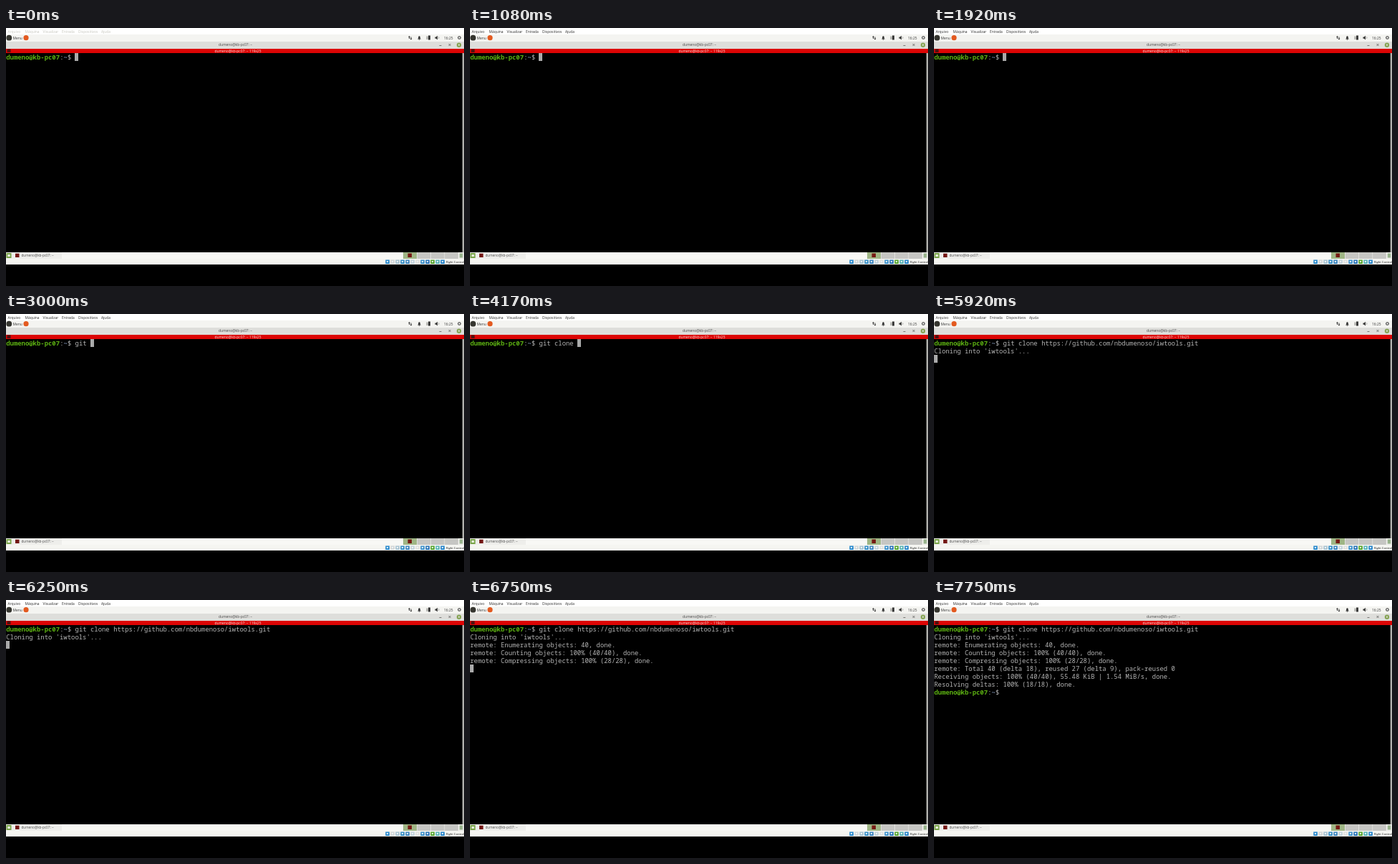
An HTML page with a canvas for the animation above (8000 ms loop, 640 px wide and 360 px high).

```html
<!DOCTYPE html>
<html lang="pt">
<head>
<meta charset="utf-8">
<title>Terminal</title>
<style>
html, body { margin: 0; width: 100%; height: 100%; overflow: hidden; background: #000; }
canvas { display: block; width: 640px; height: 360px; }
</style>
</head>
<body>
<canvas id="stage" width="640" height="360"></canvas>
<script>
const ctx = document.getElementById('stage').getContext('2d');
const LOOP = 8000;
const COL = 5.355, ROW = 11, TOP = 35;
const MONO = '"Noto Sans Mono", "DejaVu Sans Mono", monospace';
const SANS = '"Open Sans", "Noto Sans", sans-serif';
const INK = '#b4b4b4', GREEN = '#5cb012', GREY = '#aaaaaa';
const DARK = '#3a3a3a', PANEL = '#f4f4f1', TITLEBAR = '#dededb';

const HOST = 'dumeno@kb-pc07';
const TITLE = HOST + ': ~';
const PROMPT_LENGTH = HOST.length + 4;
const URL_TEXT = 'https://github.com/nbdumenoso/iwtools.git';
const COMMAND = 'git clone ';
const KEY_TIMES = [2580, 2670, 2830, 3000, 3420, 3580, 3750, 3920, 4080, 4170];
const MENU_ON = 1080, PASTE = 4830, ENTER = 5830, CURSOR_OFF = 7750;
const OUTPUT = [
  [5920, "Cloning into 'iwtools'..."],
  [6670, 'remote: Enumerating objects: 40, done.'],
  [6670, 'remote: Counting objects: 100% (40/40), done.'],
  [6750, 'remote: Compressing objects: 100% (28/28), done.'],
  [6920, 'remote: Total 40 (delta 18), reused 27 (delta 9), pack-reused 0'],
  [6920, 'Receiving objects: 100% (40/40), 55.48 KiB | 1.54 MiB/s, done.'],
  [7000, 'Resolving deltas: 100% (18/18), done.']
];
const PROMPT_BACK = 7080;

function rect(x, y, w, h, color) {
  ctx.fillStyle = color;
  ctx.fillRect(x, y, w, h);
}

function dot(x, y, r, color) {
  ctx.fillStyle = color;
  ctx.beginPath();
  ctx.arc(x, y, r, 0, Math.PI * 2);
  ctx.fill();
}

function line(color, width, ...points) {
  ctx.strokeStyle = color;
  ctx.lineWidth = width;
  ctx.beginPath();
  points.forEach(([x, y]) => ctx.lineTo(x, y));
  ctx.stroke();
}

function shape(color, ...points) {
  ctx.fillStyle = color;
  ctx.beginPath();
  points.forEach(([x, y]) => ctx.lineTo(x, y));
  ctx.fill();
}

function label(str, x, y, color = DARK, size = 4.9, align = 'left') {
  ctx.font = `${size}px ${SANS}`;
  ctx.textAlign = align;
  ctx.fillStyle = color;
  ctx.fillText(str, x, y);
}

function mono(str, col, row, color = INK, weight = 400) {
  ctx.font = `${weight} ${COL / 0.6}px ${MONO}`;
  ctx.textAlign = 'left';
  ctx.fillStyle = color;
  ctx.fillText(str, col * COL + 0.2, TOP + row * ROW + 9);
}

function block(col, row, count = 1) {
  rect(Math.round(col * COL), TOP + row * ROW, Math.round(count * COL), ROW, GREY);
}

function prompt(row) {
  mono(HOST, 0, row, GREEN, 700);
  mono(':', HOST.length, row);
  mono('~', HOST.length + 1, row, '#7f93b4', 700);
  mono('$', HOST.length + 2, row);
}

function drawMenu(t) {
  rect(0, 0, 640, 9, '#ffffff');
  const color = t < MENU_ON ? '#c6c6be' : '#2c2c2c';
  const items = [['Arquivo', 2.5], ['Máquina', 26.5], ['Visualizar', 51.5],
    ['Entrada', 78], ['Dispositivos', 101], ['Ajuda', 133]];
  items.forEach(([name, x]) => label(name, x, 6.5, color));
}

function drawPanel() {
  rect(0, 9, 640, 10, PANEL);
  dot(4.3, 13.7, 3.9, '#35352f');
  label('Menu', 9.5, 15.5);
  dot(28, 13.7, 3.6, '#e35a20');

  line(DARK, 1, [563.5, 11.5], [563.5, 15]);
  line(DARK, 1, [566, 12.5], [566, 16]);
  shape(DARK, [562, 12.8], [563.5, 11], [565, 12.8]);
  shape(DARK, [564.5, 14.7], [566, 16.5], [567.5, 14.7]);

  shape(DARK, [575, 15.5], [576, 14.5], [576.3, 12], [577.5, 11], [578.7, 12], [579, 14.5], [580, 15.5]);
  dot(577.5, 16, 0.8, DARK);

  rect(587.5, 11.5, 2, 4.5, '#a8a8a4');
  rect(590, 10.5, 3, 6, DARK);

  shape(DARK, [599.5, 12.5], [601, 12.5], [603, 10.8], [603, 16.4], [601, 14.8], [599.5, 14.8]);
  line('#888884', 0.7, [604, 12], [605, 13.6], [604, 15.2]);
  label('16:25', 612, 15.5);
  dot(633.5, 13.5, 2.3, DARK);
  dot(633.5, 13.5, 1.2, PANEL);
}

function drawTitles() {
  rect(0, 19, 640, 10, TITLEBAR);
  label(TITLE, 320.5, 25.4, '#484848', 4.9, 'center');
  line('#5c5c5a', 0.8, [605.5, 24.5], [608.5, 24.5]);
  line('#5c5c5a', 0.8, [618.5, 22], [621.5, 25]);
  line('#5c5c5a', 0.8, [621.5, 22], [618.5, 25]);
  dot(633, 23.7, 3.2, '#87a556');
  dot(633, 23.7, 1.1, TITLEBAR);

  rect(0, 29, 640, 6, '#dc0404');
  rect(1.5, 29.5, 5, 4.5, '#4c1010');
  label(TITLE + ' 119x25', 324, 33.7, '#fbe6e2', 4.9, 'center');
}

function drawTaskbar() {
  rect(0, 313, 640, 9, '#f8f8f5');
  rect(0, 313, 78, 9, '#eeeeeb');
  rect(0.5, 314, 7, 7, '#78a348');
  rect(2.3, 316, 3.4, 3, '#edf1e4');
  rect(13, 314.7, 5.5, 5.3, '#741714');
  label(TITLE, 21.5, 319.2, '#505050', 4.7);

  rect(555, 313, 19, 9, '#9fb685');
  rect(561.5, 314.5, 5.5, 5.5, '#761a14');
  for (let i = 0; i < 3; i++) rect(574.5 + i * 19.3, 313, 18.8, 9, '#c6c6c3');
  rect(632.5, 313, 7.5, 9, '#e9e9e6');
  rect(633.8, 314.5, 4.4, 6, '#98b38c');

  rect(0, 322, 640, 8, '#f5f5f1');
  const colors = ['#2889cd', '#d4d8d8', '#a9c4d2', '#368fc8', '#3c86c0', '#c3d3dc',
    '#e2e2de', '#3c91cc', '#2875ba', '#55a52d', '#58b4b8', '#2584ca'];
  colors.forEach((color, i) => {
    const x = 530.3 + i * 7;
    rect(x, 323.5, 5.6, 5.5, color);
    rect(x + 1.6, 325, 2.2, 2, '#eef2f4');
  });
  label('Right Control', 615, 328, '#222222', 4.1);
}

function drawTerminal(t) {
  rect(0, 35, 637, 278, '#000');
  rect(637, 35, 1, 278, '#30302e');
  rect(638, 35, 2, 278, '#b4b4b0');
  prompt(0);

  const typed = COMMAND.slice(0, KEY_TIMES.filter(k => t >= k).length);
  const urlCol = PROMPT_LENGTH + COMMAND.length;
  const pasted = t >= PASTE && t < ENTER;
  mono(typed, PROMPT_LENGTH, 0);
  if (pasted) block(urlCol, 0, URL_TEXT.length + 1);
  if (t >= PASTE) mono(URL_TEXT, urlCol, 0, pasted ? '#111' : INK);

  const shown = OUTPUT.filter(([time]) => t >= time);
  shown.forEach(([, str], i) => mono(str, 0, i + 1));
  const lastRow = shown.length + 1;
  const back = t >= PROMPT_BACK;
  if (back) prompt(lastRow);

  if (pasted || t >= CURSOR_OFF) return;
  if (t < ENTER) block(PROMPT_LENGTH + typed.length, 0);
  else block(back ? PROMPT_LENGTH : 0, lastRow);
}

function draw(t) {
  rect(0, 0, 640, 360, '#000');
  drawMenu(t);
  drawPanel();
  drawTitles();
  drawTerminal(t);
  drawTaskbar();
}

const start = performance.now();
function tick(now) {
  draw(Math.max(0, now - start) % LOOP);
  requestAnimationFrame(tick);
}
tick(start);
</script>
</body>
</html>
```
